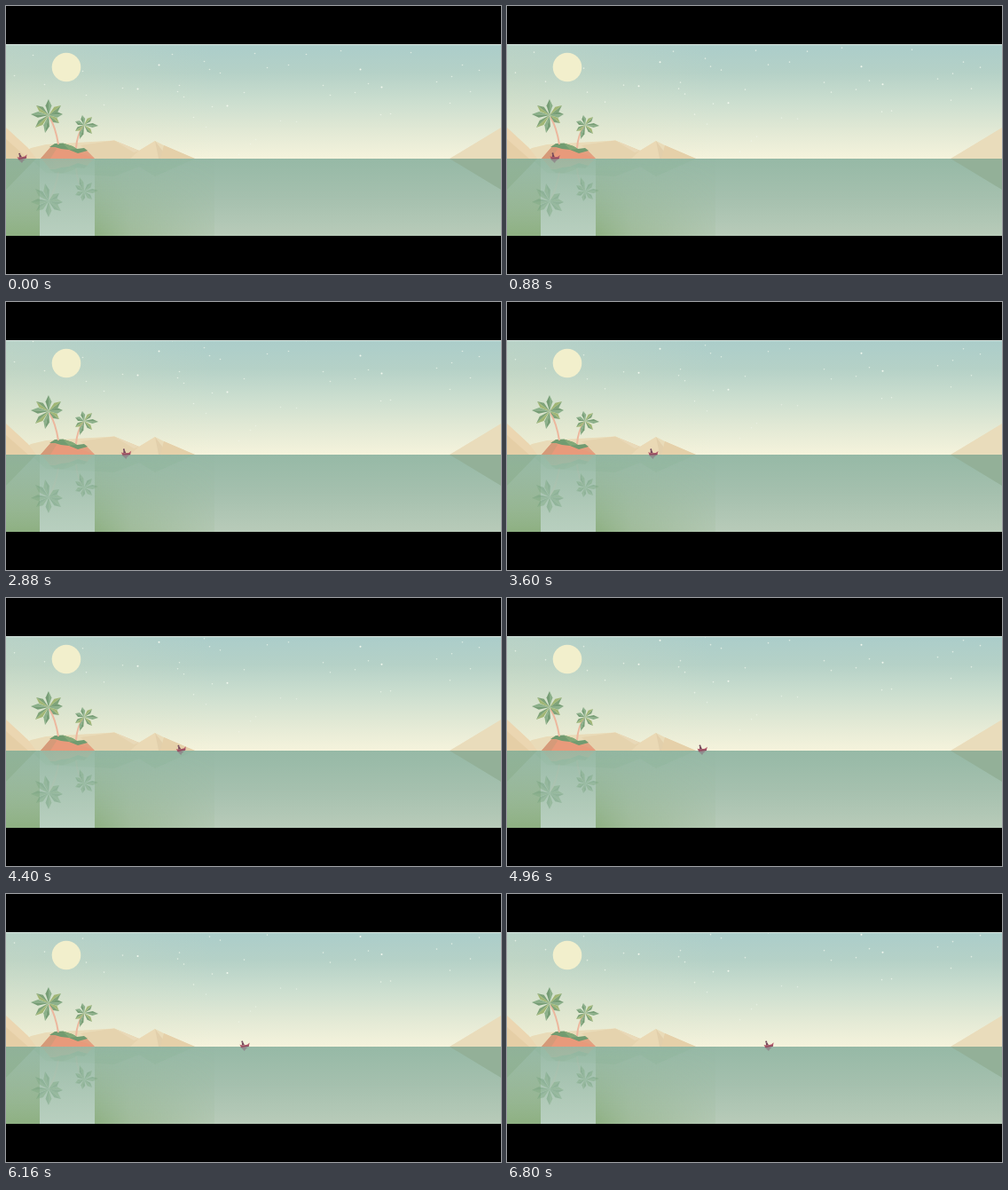
Recreate the animation shown at these times as an HTML page. Size 558 px wide and 302 px high, loop 6.88 s.

```html
<!DOCTYPE html>
<html lang="en">
<head>
<meta charset="utf-8">
<title>Island at dusk</title>
<style>
html, body { margin: 0; width: 100%; height: 100%; overflow: hidden; background: #000; }
svg { display: block; width: 558px; height: 302px; }
</style>
</head>
<body>
<svg viewBox="0 0 558 302">
  <defs>
    <linearGradient id="sky" x1="0" y1="0" x2="0" y2="1">
      <stop offset="0" stop-color="#abcdca"/>
      <stop offset=".25" stop-color="#b5d1c7"/>
      <stop offset=".5" stop-color="#cbdecf"/>
      <stop offset=".76" stop-color="#e2e9d5"/>
      <stop offset="1" stop-color="#f5f3dc"/>
    </linearGradient>
    <linearGradient id="sea" x1="0" y1="0" x2="0" y2="1">
      <stop offset="0" stop-color="#96b9a6"/>
      <stop offset=".5" stop-color="#a5c0ae"/>
      <stop offset="1" stop-color="#b8cbb9"/>
    </linearGradient>
    <linearGradient id="deep" x1="0" y1="0" x2="0" y2="1">
      <stop offset="0" stop-color="#8bb08a" stop-opacity=".05"/>
      <stop offset="1" stop-color="#86ab78" stop-opacity=".85"/>
    </linearGradient>
    <linearGradient id="fade">
      <stop offset="0" stop-color="#fff"/>
      <stop offset=".3" stop-color="#fff" stop-opacity=".55"/>
      <stop offset="1" stop-color="#fff" stop-opacity=".12"/>
    </linearGradient>
    <linearGradient id="pale" x1="0" y1="0" x2="0" y2="1">
      <stop offset="0" stop-color="#a2c3b0" stop-opacity=".2"/>
      <stop offset="1" stop-color="#b8cfbf"/>
    </linearGradient>
    <linearGradient id="haze">
      <stop offset="0" stop-color="#e6e3bd" stop-opacity=".22"/>
      <stop offset="1" stop-color="#e6e3bd" stop-opacity="0"/>
    </linearGradient>
    <mask id="side"><rect x="100" y="172" width="135" height="87" fill="url(#fade)"/></mask>
    <clipPath id="air"><rect y="44" width="558" height="128"/></clipPath>
    <clipPath id="water"><rect y="172" width="558" height="87"/></clipPath>
  </defs>

  <rect width="558" height="302"/>
  <rect y="43" width="558" height="129" fill="url(#sky)"/>
  <rect y="43" width="235" height="129" fill="url(#haze)"/>
  <rect y="43" width="558" height="1" fill="#d9e8e2"/>
  <g id="stars" clip-path="url(#air)" fill="#f4faf0"></g>
  <circle cx="68" cy="69" r="16.3" fill="#f2efcc"/>

  <g id="hills">
    <path d="M12 172L28 160 45 156 122 151.500 150 163 168 152 178 157 213 172Z" fill="#e9dbb8"/>
    <path d="M84 157L122 151.500 150 163 157 172 100 172Z" fill="#e5d3ae"/>
    <path d="M122 151.500L150 163 144 165Z" fill="#e9d9b8"/>
    <path d="M150 163L168 152 172 172 140 172Z" fill="#ead9b5"/>
    <path d="M168 152L183 172 172 172Z" fill="#e2cfab"/>
    <path d="M178 157L213 172 174 172Z" fill="#e5d0a9"/>
    <path d="M0 137L25 160 34 172 0 172Z" fill="#ebd6b1"/>
    <path d="M0 150L25 172 0 172Z" fill="#e5cea6"/>
    <path d="M558 137L500 172 558 172Z" fill="#e9dcbb"/>
  </g>

  <rect y="172" width="558" height="87" fill="url(#sea)"/>
  <path d="M500 172L558 207V172Z" fill="#93b098"/>
  <path d="M0 172V207L34 172Z" fill="#8cad91" opacity=".6"/>
  <path d="M28 172L45 188 122 192 150 181 168 192 213 172Z" fill="#8cb297" opacity=".3"/>
  <rect y="172" width="38" height="87" fill="url(#deep)"/>
  <rect x="100" y="172" width="135" height="87" fill="url(#deep)" mask="url(#side)"/>
  <rect x="38" y="172" width="62" height="87" fill="url(#pale)"/>
  <g clip-path="url(#water)"><g id="mirror" transform="matrix(1 0 0 -1 0 343)"></g></g>

  <g id="land">
    <path d="M39 172L52 157 63 156 80 163 90 162 100 172Z" fill="#e89a7b"/>
    <path d="M39 172L52 157 57 161 50 172Z" fill="#d59a79"/>
    <path d="M80 164L90 162 100 172Z" fill="#e3a080"/>
    <path d="M49 159L55 155 64 154.500 75 158 80 161 88 160 92 163 81 166 71 162 62 161 55 159Z" fill="#719b70"/>
    <path d="M64 154.500L75 158 80 161 71 162Z" fill="#83a878"/>
  </g>
  <g id="palms"></g>

  <g id="boat">
    <path d="M-5 2.500L4 2.500 1 5 0 7 -2 5Z" fill="#8b7581" opacity=".65"/>
    <g id="hull">
      <path d="M-5.500 -.8L-2 .2 3 .1 6 -1.800 4.500 2.300 -4 2.300Z" fill="#b35a6a"/>
      <path d="M-4.500 1.200L5 1 4.500 2.400 -4 2.400Z" fill="#8d4b60"/>
      <path d="M-3 .2L-2.800 -2.800 -1.300 -3.100 0 .2Z" fill="#75475a"/>
      <circle cx="-2.200" cy="-3.800" r="1" fill="#70465a"/>
    </g>
  </g>
</svg>
<script>
const LOOP = 6880, STEP = 80, LIFT = 0.0038;
const NS = "http://www.w3.org/2000/svg";
const $ = id => document.getElementById(id);

function add(parent, tag, attrs) {
  const node = document.createElementNS(NS, tag);
  for (const key in attrs) node.setAttribute(key, attrs[key]);
  parent.appendChild(node);
  return node;
}

// Each frond is a two-tone blade from the crown to its tip.
function palm(parent, cx, cy, trunk, tips, width) {
  add(parent, "path", { d: trunk, fill: "none", stroke: "#ecb79e", "stroke-width": 2 });
  tips.forEach(([x, y], i) => {
    const dx = x - cx, dy = y - cy, len = Math.hypot(dx, dy);
    const mx = cx + dx * 0.6, my = cy + dy * 0.6;
    const nx = -dy / len * width, ny = dx / len * width;
    const blade = (s, fill) => add(parent, "path", {
      d: `M${cx} ${cy}L${mx + nx * s} ${my + ny * s}L${x} ${y}Z`, fill
    });
    blade(1, i % 2 ? "#7fa378" : "#8bb08a");
    blade(-1, i % 2 ? "#a1b675" : "#769d75");
  });
}

const palms = $("palms");
palm(palms, 48, 123, "M59 156Q56 137 49 125",
  [[48, 105], [62, 112], [64, 122], [60, 132], [44, 143], [33, 137], [28, 122], [34, 112]], 3.4);
palm(palms, 88, 134, "M79 160Q80 145 87 136",
  [[86, 123], [97, 125], [104, 135], [97, 144], [83, 150], [78, 141], [78, 130]], 2.5);

const mirror = $("mirror");
for (const [id, alpha] of [["land", 0.1], ["palms", 0.45]]) {
  const copy = $(id).cloneNode(true);
  copy.removeAttribute("id");
  copy.setAttribute("opacity", alpha);
  if (id === "palms") copy.querySelectorAll("path").forEach((p, i) => {
    if (p.getAttribute("stroke")) p.setAttribute("opacity", 0.15);
    else p.setAttribute("fill", i % 2 ? "#7ea982" : "#6f9d79");
  });
  mirror.appendChild(copy);
}

const spots = [
  187, 54, 223, 62, 229, 71, 172, 66, 148, 93, 200, 102, 195, 89, 280, 53,
  338, 54, 377, 50, 399, 71, 456, 52, 423, 91, 365, 100, 393, 97, 500, 109,
  523, 96, 533, 72, 514, 66, 249, 112, 232, 113, 268, 97, 90, 100, 110, 111,
  30, 55, 9, 78, 485, 85, 502, 79, 241, 75, 211, 125, 225, 136, 309, 129,
  327, 130, 275, 155, 281, 150, 408, 87, 433, 121, 422, 122, 86, 73, 357, 89,
  294, 69, 318, 66, 193, 96, 131, 92, 43, 88, 262, 167
];
const stars = $("stars");
for (let i = 0; i < spots.length; i += 2) {
  const bright = [172, 148, 399, 423, 249, 226].includes(spots[i]);
  const y = spots[i + 1];
  add(stars, "circle", {
    cx: spots[i] + 0.5, cy: y + 0.5, r: bright ? 1 : 0.8,
    opacity: bright ? 0.95 : y > 125 ? 0.5 : 0.65
  });
}
const dots = [...stars.children];

function draw(now) {
  const t = Math.floor((now % LOOP) / STEP) * STEP;
  dots.forEach(dot => dot.setAttribute("transform", `translate(0 ${-LIFT * t})`));
  const x = 18 + 277 * t / 6800;
  const rock = -5 - 5 * Math.cos(t / 2200 * Math.PI * 2);
  $("boat").setAttribute("transform", `translate(${x} 170)`);
  $("hull").setAttribute("transform", `rotate(${rock})`);
}

const start = performance.now();
function tick() {
  draw(performance.now() - start);
  requestAnimationFrame(tick);
}
tick();
</script>
</body>
</html>
```
